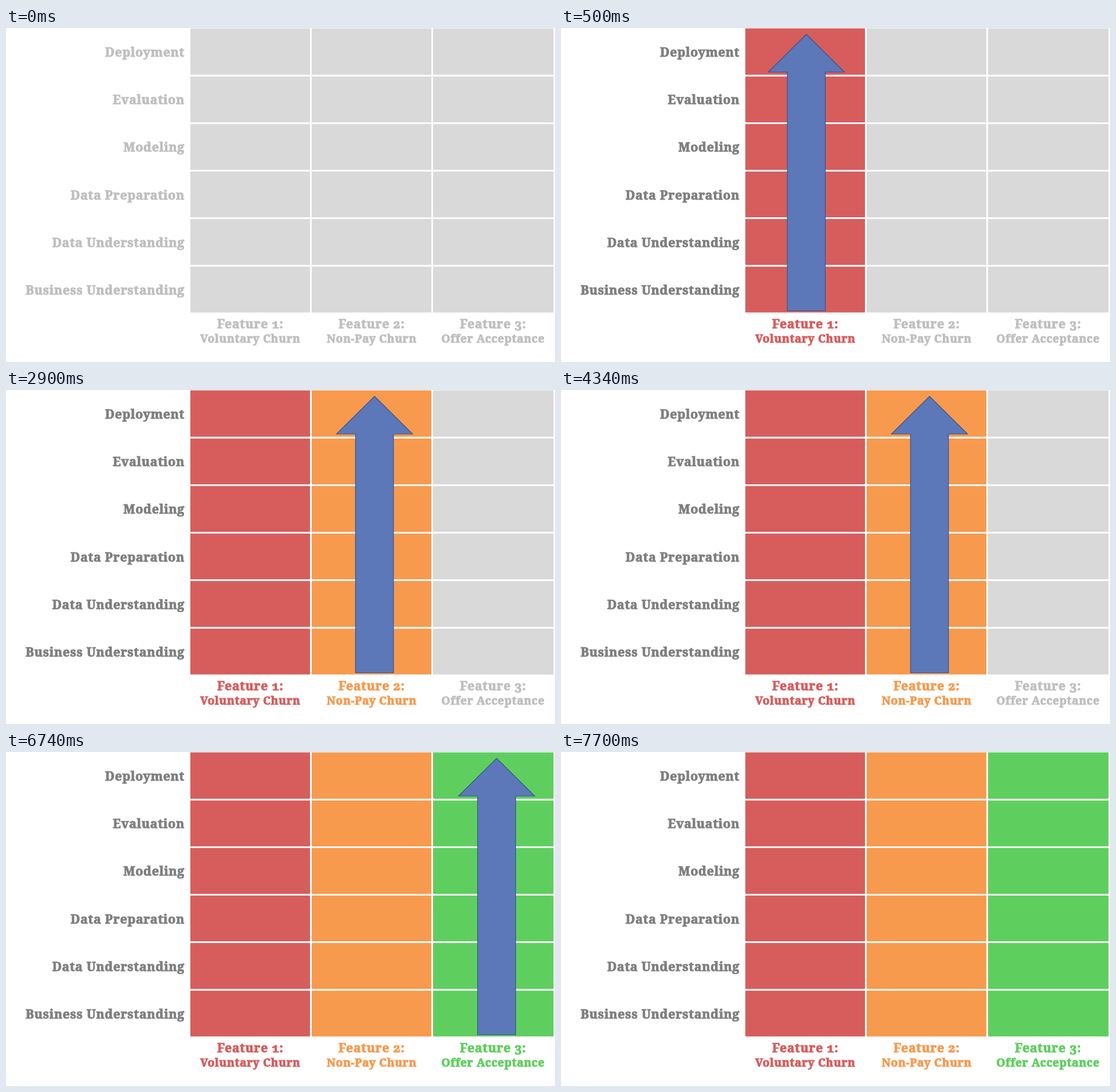
An HTML page that plays this animation: 959 by 584 pixels, repeating every 8 s.

```html
<!DOCTYPE html>
<html lang="en">
<head>
<meta charset="utf-8">
<title>Features by project phase</title>
<style>
html, body { margin: 0; width: 100%; height: 100%; overflow: hidden; background: #fff; }
svg { display: block; }
text {
  font: 700 21.6px "Noto Serif", serif;
  letter-spacing: .03em;
  font-variant-numeric: oldstyle-nums;
  stroke: currentColor; stroke-width: 1; fill: currentColor;
}
.feature { text-anchor: middle; }
.feature .detail { font-size: 19.6px; }
#phases { text-anchor: end; }
</style>
</head>
<body>
<svg id="stage" width="959" height="584" viewBox="0 0 959 584">
  <g id="columns"></g>
  <path id="lines" stroke="#fff" stroke-width="3"/>
  <g id="phases"></g>
  <path id="arrow" d="M0 11L66.5 77H33.2V494.5H-33.2V77H-66.5Z" fill="#5c78b8" stroke="#32548f" stroke-width="1.2"/>
</svg>
<script>
const LOOP = 8000, START = 500, STEP = 2400;
const ROW = 83.1, COLUMN = 212, LEFT = 322;
const phases = ["Deployment", "Evaluation", "Modeling", "Data Preparation",
  "Data Understanding", "Business Understanding"];
const features = [
  { detail: "Voluntary Churn", color: "#d75d5d", arrowX: 428.5 },
  { detail: "Non-Pay Churn", color: "#f79a4e", arrowX: 643.7 },
  { detail: "Offer Acceptance", color: "#5ecf5e", arrowX: 857 }
];
const byId = id => document.getElementById(id);

function add(parent, name, attributes, content = "") {
  const node = document.createElementNS("http://www.w3.org/2000/svg", name);
  for (const key in attributes) node.setAttribute(key, attributes[key]);
  node.textContent = content;
  return parent.appendChild(node);
}

features.forEach((feature, i) => {
  const x = LEFT + i * COLUMN, center = x + 104.8;
  feature.cells = add(byId("columns"), "rect", { x, y: 0.7, width: i < 2 ? COLUMN : 210.5, height: 496.7 });
  feature.label = add(byId("stage"), "g", { class: "feature" });
  add(feature.label, "text", { x: center, y: 525 }, `Feature ${i + 1}:`);
  add(feature.label, "text", { x: center, y: 549.5, class: "detail" }, feature.detail);
});

let grid = "M532.5 0V498M744.5 0V498";
phases.forEach((phase, i) => {
  if (i) grid += `M321 ${0.2 + i * ROW}H958`;
  add(byId("phases"), "text", { x: 312, y: 50.2 + i * ROW }, phase);
});
byId("lines").setAttribute("d", grid);

function draw(now) {
  const active = Math.floor((now % LOOP - START) / STEP);
  features.forEach(({ cells, label, color }, i) => {
    cells.setAttribute("fill", i <= active ? color : "#d9d9d9");
    label.style.color = i <= active ? color : "#bfbfbf";
  });
  byId("phases").style.color = active < 0 ? "#bfbfbf" : "#7f7f7f";
  const current = features[active];
  byId("arrow").style.display = current ? "" : "none";
  if (current) byId("arrow").setAttribute("transform", `translate(${current.arrowX})`);
}

const origin = performance.now();
function tick() {
  draw(performance.now() - origin);
  requestAnimationFrame(tick);
}
tick();
</script>
</body>
</html>
```
